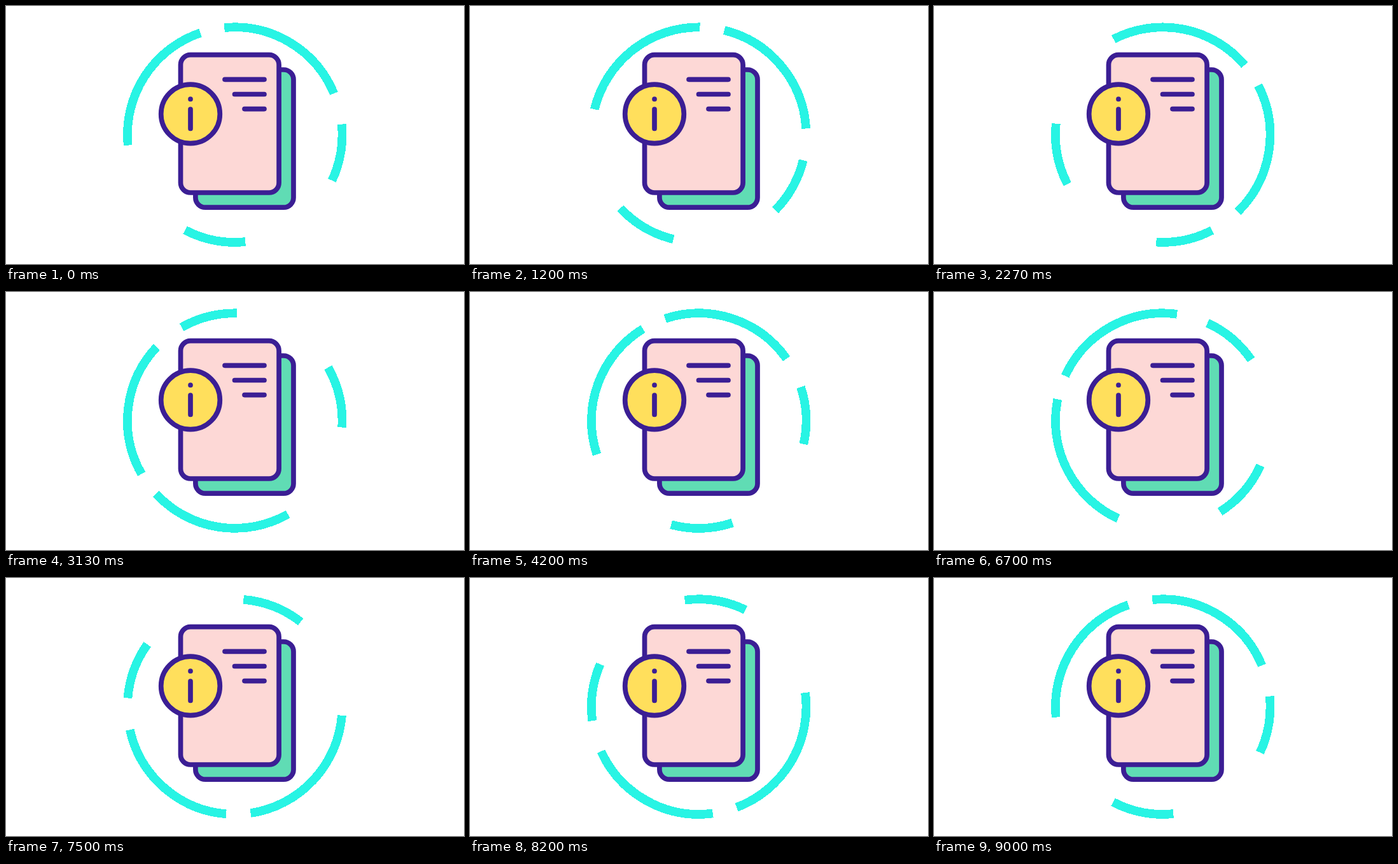
An HTML page that plays this animation: 720x405 px, repeating every 9.03 s.

```html
<!DOCTYPE html>
<html lang="en">
<head>
<meta charset="utf-8">
<title>Information document</title>
<style>
  html, body { margin: 0; width: 100%; height: 100%; overflow: hidden; background: #fff; }
  svg { display: block; width: 100vw; height: 100vh; }
  .ring { fill: none; stroke: #28f4e4; stroke-width: 13.7; shape-rendering: crispEdges; }
  .icon { stroke: #3b1e94; stroke-width: 7.7; stroke-linecap: round; }
  .back { fill: #60dcb4; }
  .front { fill: #fdd8d6; }
  .badge { fill: #ffdf5c; }
</style>
</head>
<body>
<svg viewBox="0 0 720 405">
  <g id="ring" class="ring"></g>
  <g class="icon">
    <rect class="back" x="297.9" y="100" width="154.1" height="216.2" rx="15.5"/>
    <rect class="front" x="274.5" y="76.7" width="154.6" height="216.3" rx="15.5"/>
    <path d="M344 115.3H406M359.5 138.5H406M375 161.6H406"/>
    <circle class="badge" cx="290" cy="169.4" r="46.3"/>
    <path d="M290 146.2h.01M290 162V192.5"/>
  </g>
</svg>
<script>
  const CX = 359.7, CY = 202.1, R = 168.8;
  const LOOP = 9030, CYCLE = 9000, FRAME = 100 / 3;
  const TURN = 8 * 360, MOVE = 4150, FORWARD = 1828, BACK = 6275;
  const GRIP = 0.41; // how strongly both ends of a move are eased

  const ring = document.getElementById('ring');

  // Degrees run clockwise from the top
  function point(deg) {
    const a = deg * Math.PI / 180;
    return `${(CX + R * Math.sin(a)).toFixed(2)} ${(CY - R * Math.cos(a)).toFixed(2)}`;
  }

  // One arc starts in each quarter
  [73, 30.8, 33.2, 76.9].forEach((length, i) => {
    const start = i * 90 - 3.4;
    const path = document.createElementNS('http://www.w3.org/2000/svg', 'path');
    path.setAttribute('d', `M${point(start)}A${R} ${R} 0 0 1 ${point(start + length)}`);
    ring.append(path);
  });

  // Same curve as cubic-bezier(GRIP, 0, 1 - GRIP, 1), solved by bisection
  function ease(x) {
    if (x <= 0 || x >= 1) return x <= 0 ? 0 : 1;
    let low = 0, high = 1, u;
    for (let i = 0; i < 24; i++) {
      u = (low + high) / 2;
      const r = 1 - u;
      const at = 3 * u * r * (GRIP * r + (1 - GRIP) * u) + u ** 3;
      if (at < x) low = u; else high = u;
    }
    return u * u * (3 - 2 * u);
  }

  // Eight turns forward, a rest, eight turns back, a rest
  function angleAt(ms) {
    const t = ms < FORWARD ? ms + CYCLE : ms;
    return TURN * (ease((t - FORWARD) / MOVE) - ease((t - BACK) / MOVE));
  }

  const begin = performance.now();

  // The ring moves in hard steps, 30 per second
  function draw() {
    const t = Math.max(0, performance.now() - begin) % LOOP;
    const step = Math.min(CYCLE / FRAME, Math.floor((t + 3.5) / FRAME));
    ring.setAttribute('transform', `rotate(${angleAt(step * FRAME).toFixed(2)} ${CX} ${CY})`);
    requestAnimationFrame(draw);
  }
  draw();
</script>
</body>
</html>
```
